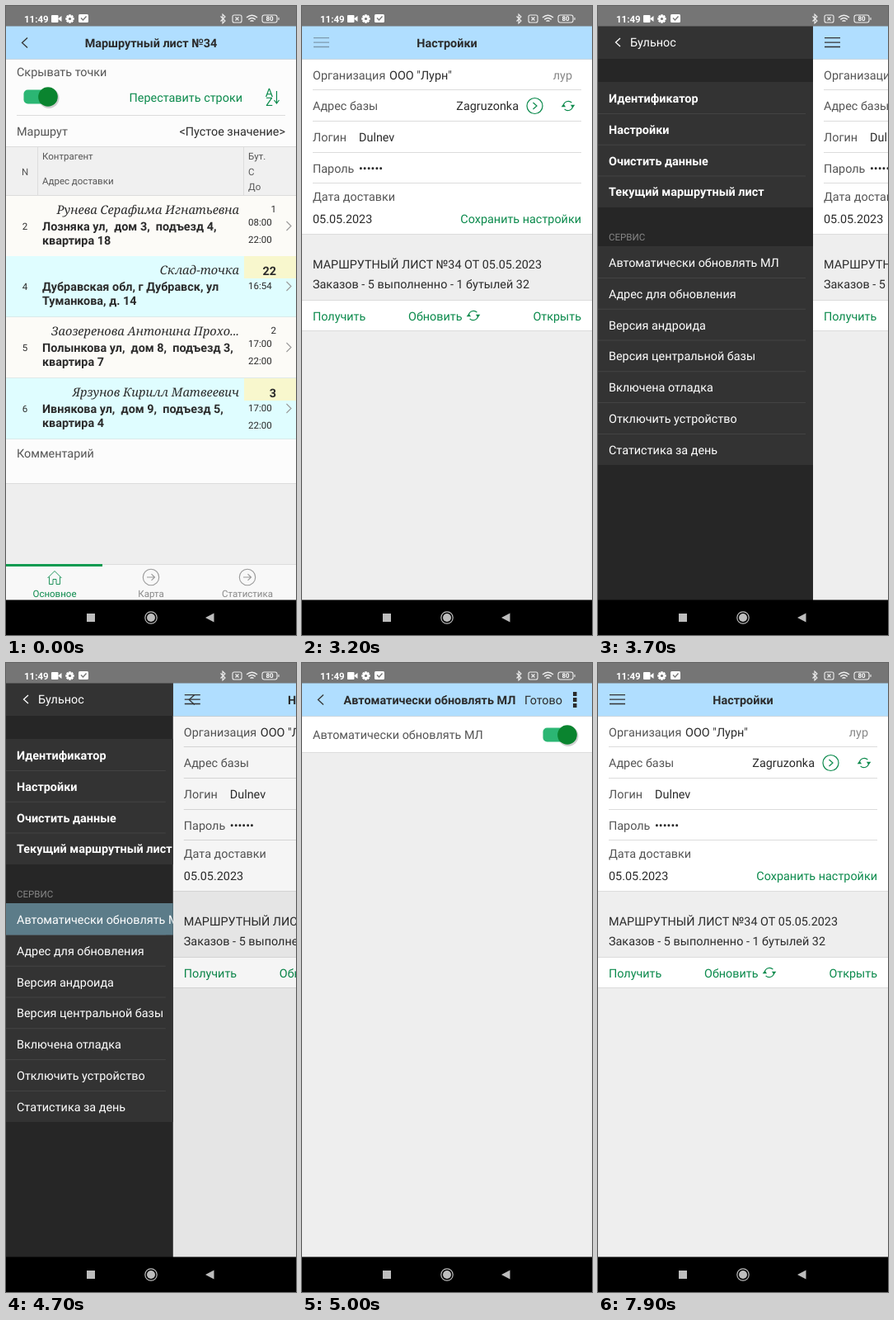
An HTML page for the animation above (8000 ms loop, 352 by 762 pixels).

```html
<!DOCTYPE html>
<html lang="ru">
<head>
<meta charset="utf-8">
<style>
html, body { margin: 0; width: 100%; height: 100%; overflow: hidden; background: #eee; }
svg { display: block; }
text { font: 14.4px Roboto, sans-serif; fill: #2b2b2b; white-space: pre; text-rendering: geometricPrecision; }
.b { font-weight: 700; }
.s { font-size: 11.5px; }
.l { fill: #555; }
.g { fill: #0b8a4c; }
.w { fill: #fff; }
.h { fill: #888; }
.e { text-anchor: end; }
.m { text-anchor: middle; }
.i { font: italic 14.6px "Noto Serif", serif; }
.line { fill: none; stroke: #333; stroke-width: 1.3; }
.green { fill: none; stroke: #0b8a4c; stroke-width: 1.2; }
.gray { fill: none; stroke: #999; stroke-width: 1.1; }
</style>
</head>
<body>
<svg id="stage" width="352" height="762" viewBox="0 0 352 762"></svg>
<script>
const text = (x, y, str, cls = '') =>
  `<text x="${x}" y="${y}" class="${cls}">${str.replace(/</g, '&lt;')}</text>`;
const rect = (x, y, w, h, fill, extra = '') =>
  `<rect x="${x}" y="${y}" width="${w}" height="${h}" fill="${fill}" ${extra}/>`;
const path = (d, cls = 'line', extra = '') => `<path d="${d}" class="${cls}" ${extra}/>`;
const at = (x, y, body) => `<g transform="translate(${x} ${y})">${body}</g>`;
const rule = (y, x = 0, w = 352) => rect(x, y, w, 1, '#dcdcdc');
const header = rect(0, 24, 352, 40, '#b0deff') + rect(0, 64, 352, 1, '#c9d6df');
const back = id => path('M26 38.5L19.5 44.5L26 50.5', 'line', `id="${id}"`);

const refresh = (x, y) => at(x, y,
  path('M-5.6 0A5.8 5.8 0 0 1 4.4 -3.8M5.6 0A5.8 5.8 0 0 1 -4.4 3.8', 'green') +
  '<path d="M-8.3 1.2h5.4l-2.7 -3.6zM8.3 -1.2h-5.4l2.7 3.6z" fill="#0b8a4c"/>');

const toggle = (x, y, id) => at(x, y,
  rect(-.5, -8.5, 39, 17, '#2bb673', 'rx="5"') +
  `<g id="${id}Off" opacity="0">${rect(-.5, -8.5, 39, 17, '#b4b4b4', 'rx="5"')}</g>` +
  `<g id="${id}Knob" transform="translate(29)">
    <circle cx="1" cy="1.5" r="12.5" fill="#000" opacity=".18"/>
    <circle r="11.8" fill="#0a842f"/>
    <circle id="${id}Pale" r="11.8" fill="#f2f2f2" opacity="0"/></g>`);

function settingsPage() {
  const rows = [['Организация', 89], ['Адрес базы', 126], ['Логин', 164], ['Пароль', 202], ['Дата доставки', 236]];
  return rect(0, 24, 352, 696, '#eee') + rect(0, 64, 352, 212, '#fff') +
    rect(0, 357, 352, 36, '#fff') + header +
    path('M14 38.7h19M14 44.1h19M14 49.5h19', 'line', 'id="menu"') +
    `<g id="menuBack" visibility="hidden">${back('menuArrow')}</g>` +
    text(176, 50, 'Настройки', 'b m') +
    rows.map(([s, y]) => text(13, y, s, 'l')).join('') +
    [101, 139, 177, 214].map(y => rule(y, 13, 326)).join('') +
    [276, 356, 393].map(y => rule(y)).join('') +
    text(106, 89, 'ООО "Лурн"') + text(328, 89, 'лур', 'h e') +
    text(263, 126, 'Zagruzonka', 'e') + text(69, 164, 'Dulnev') + text(69, 202, '••••••') +
    '<circle cx="282.5" cy="121" r="9.5" class="green"/>' +
    path('M280.5 117l4.5 4l-4.5 4', 'green') + refresh(323, 121) +
    text(13, 263, '05.05.2023') + text(339, 263, 'Сохранить настройки', 'g e') +
    text(13, 318, 'МАРШРУТНЫЙ ЛИСТ №34 ОТ 05.05.2023') +
    text(13, 342, 'Заказов - 5 выполненно - 1 бутылей 32') +
    text(13, 381, 'Получить', 'g') + text(129, 381, 'Обновить', 'g') + refresh(208, 375) +
    text(339, 381, 'Открыть', 'g e') +
    rect(0, 64, 352, 656, '#000', 'id="shade" opacity="0"');
}

function routeRow([num, name, line1, line2, count, ...times], i) {
  const odd = i % 2, first = odd ? 40 : 36;
  return at(0, 230 + Math.floor(i * 73.8),
    rect(0, 0, 352, 74, odd ? '#dffdff' : '#fcfbf7') +
    (odd ? rect(289, 0, 63, 27, '#f8f7cd') : '') + rect(0, 73, 352, .8, '#d9e6e6') +
    text(23, 41, num, 's m') + text(283, 22, name, 'i e') +
    text(44, 42, line1, 'b') + text(44, 59, line2, 'b') +
    (odd ? text(328, 23, count, 'b e') : text(328, 20, count, 's e')) +
    times.map((s, k) => text(294, first + k * 21, s, 's')).join('') +
    path('M340.5 31l5.5 5.5l-5.5 5.5', 'gray'));
}

function routePage() {
  const rows = [
    ['2', 'Рунева Серафима Игнатьевна', 'Лозняка ул,  дом 3,  подъезд 4,', 'квартира 18', '1', '08:00', '22:00'],
    ['4', 'Склад-точка', 'Дубравская обл, г Дубравск, ул', 'Туманкова, д. 14', '22', '16:54'],
    ['5', 'Заозеренова Антонина Прохо...', 'Полынкова ул,  дом 8,  подъезд 3,', 'квартира 7', '2', '17:00', '22:00'],
    ['6', 'Ярзунов Кирилл Матвеевич', 'Ивнякова ул,  дом 9,  подъезд 5,', 'квартира 4', '3', '17:00', '22:00']
  ];
  const ring = x => at(x, 692, '<circle r="9.7" class="gray"/>' + path('M-5 0h9M.5 -3.8L4.5 0L.5 3.8', 'gray'));
  return rect(0, 24, 352, 696, '#eee') + rect(0, 64, 352, 515, '#fcfcfc') + header +
    back('routeBack') + text(176, 50, 'Маршрутный лист №34', 'b m') +
    text(13, 85, 'Скрывать точки', 'l') + toggle(22, 110, 'hide') +
    text(287, 116, 'Переставить строки', 'g e') +
    text(319.5, 109.500, 'A', 'g m') + text(319.5, 121, 'Z', 'g m') +
    path('M328.5 103v14M325.5 114l3 4l3 -4', 'green') +
    rule(132, 13, 326) + text(13, 157, 'Маршрут', 'l') + text(339, 157, '<Пустое значение>', 'e') +
    rect(0, 170, 352, 60, '#f0f0f0') + rule(170) + rule(229) +
    rect(38, 170, 1, 60, '#ddd') + rect(288, 170, 1, 60, '#ddd') +
    text(23, 205, 'N', 's l m') + text(44, 186, 'Контрагент', 's l') + text(44, 216, 'Адрес доставки', 's l') +
    ['Бут.', 'С', 'До'].map((s, k) => text(294, 186 + k * 18.5, s, 's l')).join('') +
    rows.map(routeRow).join('') +
    text(13, 547, 'Комментарий', 'l') + rule(578) +
    rect(0, 676, 352, 44, '#f8f8f8') + rule(676) + rect(0, 676, 117, 3, '#0b9a50') +
    path('M50.500 693l8.500 -8.500l8.500 8.500M52.5 691.500v9h4.5v-6h4v6h4.5v-9', 'green', 'style="stroke-width:.9"') +
    ring(176) + ring(293) + text(59, 716, 'Основное', 's g m') +
    text(176, 716, 'Карта', 's h m') + text(293, 716, 'Статистика', 's h m');
}

function autoPage() {
  return rect(0, 24, 352, 696, '#eee') + rect(0, 64, 352, 44, '#fff') + header + rule(108) +
    back('autoBack') + text(155, 50, 'Автоматически обновлять МЛ', 'b m') + text(270, 50, 'Готово') +
    [35, 42, 49].map(y => rect(329, y, 4.5, 5, '#2b2b2b')).join('') +
    text(13, 92, 'Автоматически обновлять МЛ', 'l') + toggle(293, 87, 'auto');
}

function drawer() {
  const main = ['Идентификатор', 'Настройки', 'Очистить данные', 'Текущий маршрутный лист'];
  const service = ['Автоматически обновлять МЛ', 'Адрес для обновления', 'Версия андроида',
    'Версия центральной базы', 'Включена отладка', 'Отключить устройство', 'Статистика за день'];
  const step = 37.8;
  const seps = (n, y) => Array.from({ length: n }, (_, k) => rect(-250, y + k * step, 502, .8, '#484848')).join('');
  return rect(0, 24, 262, 696, '#262626') + rect(0, 24, 262, 40, '#333') +
    rect(0, 92, 262, 152, '#333') + rect(0, 291, 262, 265, '#333') +
    path('M27 39l-5.5 5l5.5 5', 'line', 'style="stroke:#fff"') + text(39, 49, 'Бульнос', 'w') +
    `<g id="seps">${seps(3, 130)}${seps(6, 329)}</g>` +
    rect(0, 291, 262, 38.5, '#5c7c89', 'id="picked"') +
    main.map((s, k) => text(13, 117 + k * step, s, 'b w')).join('') +
    text(13, 284, 'СЕРВИС', 's h') +
    service.map((s, k) => text(13, 316 + k * step, s, 'w')).join('');
}

function systemBars() {
  const teeth = Array.from({ length: 8 }, (_, k) =>
    `<rect x="-1.2" y="-5" width="2.4" height="10" transform="rotate(${k * 45})"/>`).join('');
  return rect(0, 0, 352, 24.5, '#757575') + text(22, 19.5, '11:49', 's b w') +
    '<g fill="#fff"><rect x="55" y="11" width="8.5" height="9" rx="1"/><path d="M63 15.5l4.5 -3.5v7z"/>' +
    at(77.5, 15.5, teeth + '<circle r="3.8"/><circle r="1.6" fill="#757575"/>') +
    '<rect x="88" y="10" width="12" height="10" rx="1.5"/></g>' +
    path('M91 14.5l2.5 2.5l4 -4.5', 'line', 'style="stroke:#757575"') +
    '<g fill="none" stroke="#eee" stroke-width="1.1">' +
    '<path d="M260.5 12.5l5.5 5.5l-3 3v-11l3 3l-5.5 5.5"/>' +
    '<rect x="275" y="11" width="11" height="9" rx="2"/><path d="M278.5 13.5l4 4m0 -4l-4 4"/>' +
    '<path d="M292 14q6.5 -5.5 13 0M294.3 16.3q4.2 -3.4 8.4 0M296.5 18.5q2 -1.5 4 0" stroke-width="1.5"/>' +
    '<rect x="311" y="11" width="18" height="9" rx="2.5"/><path d="M331 14v3"/></g>' +
    '<text x="320" y="18.4" class="b w m" style="font-size:8px">80</text>' +
    rect(0, 719.5, 352, 43, '#000') + rect(98, 736, 10, 10, '#bdbdbd') +
    '<circle cx="176" cy="741" r="7.2" fill="none" stroke="#bdbdbd" stroke-width="1.2"/>' +
    '<circle cx="176" cy="741" r="5" fill="#bdbdbd"/><path d="M242 741l10.5 -5.5v11z" fill="#bdbdbd"/>';
}

const group = (id, body) => `<g id="${id}">${body}</g>`;
const el = id => document.getElementById(id);
el('stage').innerHTML = group('settings', settingsPage()) + group('route', routePage()) +
  group('auto', autoPage()) + `<svg id="drawer" width="0" height="762">${drawer()}</svg>` + systemBars();

const ramp = (t, from, to) => {
  const u = Math.min(1, Math.max(0, (t - from) / (to - from)));
  return u * u * (3 - 2 * u);
};
const set = (id, name, value) => el(id).setAttribute(name, value);
const move = (id, x) => set(id, 'transform', `translate(${x})`);
const show = (id, on) => set(id, 'visibility', on ? 'inherit' : 'hidden');
const within = (t, from, to) => t >= from && t < to;

function draw(now) {
  const t = Math.floor(now % 8000 / 100) * 100; // the screen updates ten times a second
  const open = 261 * (ramp(t, 3300, 3700) - ramp(t, 4568, 5000));
  const swap = within(t, 4700, 5000);

  show('route', t < 600);
  move('route', 352 * ramp(t, 300, 600));
  set('routeBack', 'opacity', t >= 100 ? .4 : 1);

  move('settings', open);
  set('menu', 'opacity', within(t, 3200, 3400) ? .4 : 1);
  show('menuBack', swap);
  set('shade', 'opacity', swap ? .04 : 0);

  set('drawer', 'width', open);
  move('seps', open - 261);
  show('picked', t >= 4400);

  show('auto', within(t, 4800, 7900));
  move('auto', open + 352 * ramp(t, 7500, 7900));
  set('auto', 'opacity', ramp(t, 4650, 5000));
  set('autoBack', 'opacity', t >= 7100 ? .4 : 1);

  const off = ramp(t, 5500, 5700) - ramp(t, 6200, 6500);
  move('autoKnob', 29 - 18 * off);
  set('autoOff', 'opacity', off);
  set('autoPale', 'opacity', off);
}

function loop() {
  draw(performance.now());
  requestAnimationFrame(loop);
}
loop();
</script>
</body>
</html>
```
